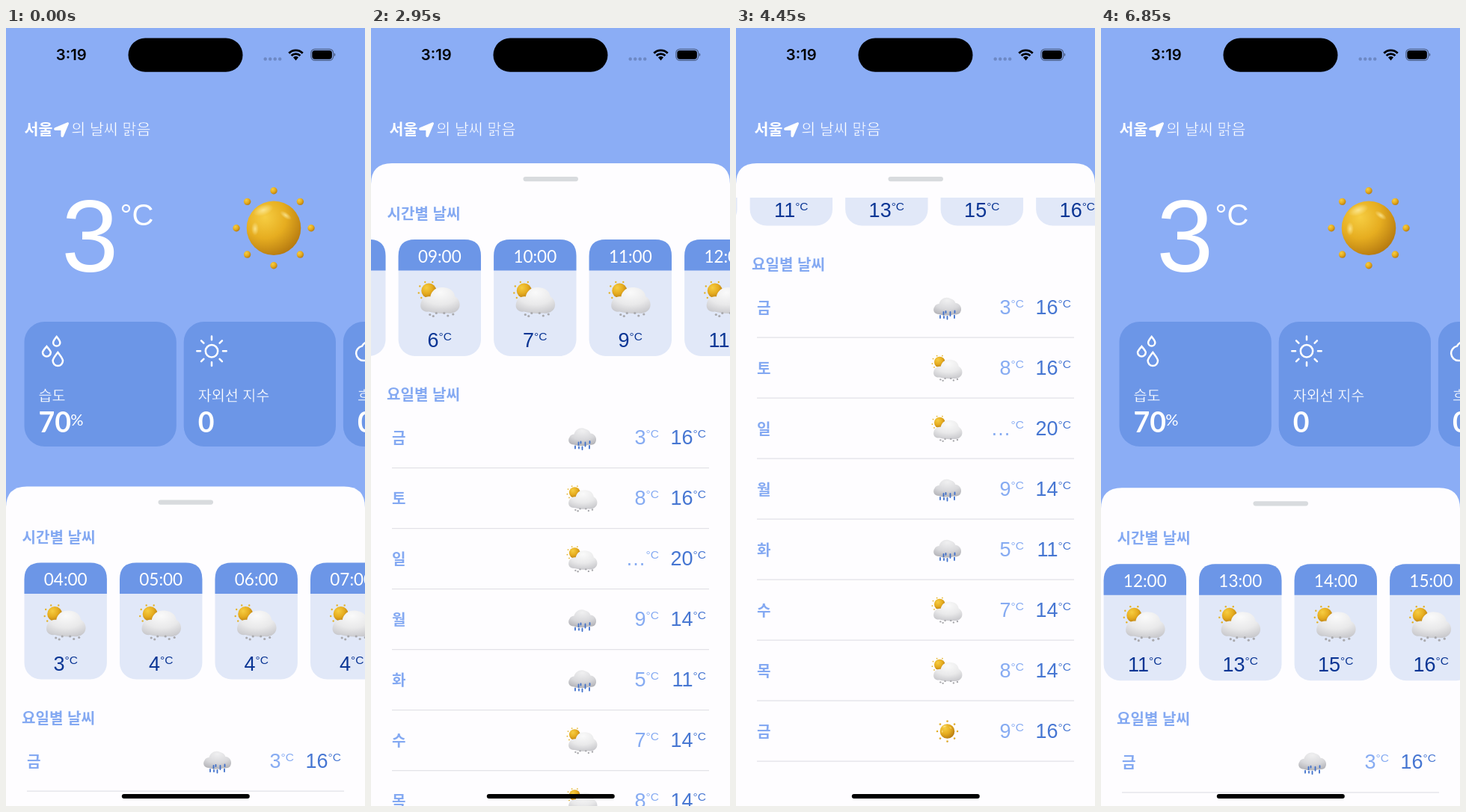
Animation, 480 px wide and 1041 px high, one loop 6.9 s. Source, as an HTML page:

```html
<!DOCTYPE html>
<html lang="ko">
<head>
<meta charset="utf-8">
<title>날씨</title>
<style>
html, body { margin: 0; width: 100%; height: 100%; overflow: hidden; background: #8badf5; }
svg { display: block; width: 100%; height: 100%; }
text { font-family: "Noto Sans CJK KR", "Noto Sans CJK", sans-serif; fill: #fff; }
.num { font-family: "Liberation Sans", sans-serif; font-size: 27px; }
.lato { font-family: Lato, sans-serif; }
.thin { font-weight: 300; stroke: #8badf5; stroke-width: .5; }
.label { font-size: 19.6px; font-weight: 300; stroke: #6c96e7; stroke-width: .3; }
.value { font-size: 37.5px; font-weight: 700; }
.title { font-size: 20.1px; font-weight: 600; fill: #84a9f2; }
.mid { text-anchor: middle; }
.end { text-anchor: end; }
.line { fill: none; stroke: #fff; stroke-width: 2.5; stroke-linecap: round; }
</style>
</head>
<body>
<svg viewBox="0 0 480 1041">
  <defs>
    <radialGradient id="gold" cx=".34" cy=".3" r=".78">
      <stop offset="0" stop-color="#f6cd42"/>
      <stop offset=".5" stop-color="#e6ad20"/>
      <stop offset="1" stop-color="#b2760f"/>
    </radialGradient>
    <radialGradient id="shine">
      <stop offset="0" stop-color="#fff3b0" stop-opacity=".7"/>
      <stop offset="1" stop-color="#fff3b0" stop-opacity="0"/>
    </radialGradient>
    <radialGradient id="puff" cx=".5" cy=".2" r=".85">
      <stop offset="0" stop-color="#fafafa"/>
      <stop offset=".55" stop-color="#e9e9ea"/>
      <stop offset="1" stop-color="#c6c6ca"/>
    </radialGradient>
    <radialGradient id="gray" cx=".5" cy=".15" r=".85">
      <stop offset="0" stop-color="#f0f0f1"/>
      <stop offset=".6" stop-color="#d8d8db"/>
      <stop offset="1" stop-color="#b4b4b9"/>
    </radialGradient>
    <clipPath id="view"><rect y="46" width="480" height="1000"/></clipPath>
    <g id="sun"></g>
    <g id="partly"></g>
    <g id="rain"></g>
  </defs>

  <rect width="480" height="1041" fill="#8badf5"/>

  <text x="24.5" y="143.3" font-size="20.6" font-weight="700">서울</text>
  <path d="M82.2 126.3L65 133.6Q63 136 65.5 137H73.4V144.8Q74.6 147.3 76.8 145.2L84 128Q84.2 125.8 82.2 126.3Z" fill="#fff"/>
  <text class="thin" x="87.2" y="143.3" font-size="20.6">의 날씨 맑음</text>
  <text class="num" x="74.3" y="326" style="font-size:136.5px">3</text>
  <text class="num" x="152.5" y="264" style="font-size:40px">°C</text>
  <use href="#sun" x="358" y="267.7"/>
  <g id="info"></g>

  <g id="sheet">
    <path d="M0 1041V28Q0 0 28 0H452Q480 0 480 28V1041Z" fill="#fefdff"/>
    <rect x="203.5" y="18" width="73.5" height="6.2" rx="3.1" fill="#d8dbde"/>
    <g clip-path="url(#view)">
      <g id="list">
        <text class="title" x="21.5" y="75">시간별 날씨</text>
        <g id="hours"></g>
        <text class="title" x="21" y="317.3">요일별 날씨</text>
        <g id="days"></g>
      </g>
    </g>
  </g>

  <text class="mid" x="87.3" y="43" style="font:600 20.3px Inter,sans-serif;fill:#000">3:19</text>
  <rect x="163.5" y="13.5" width="153" height="45.3" rx="22.6"/>
  <g id="status"></g>
  <rect x="407.8" y="28.3" width="29.8" height="15" rx="5" fill="none" stroke="#000" stroke-opacity=".45" stroke-width="1.2"/>
  <rect x="409.3" y="29.9" width="26.6" height="11.8" rx="3.6"/>
  <path d="M438.8 33.3q3 2.4 0 5z" opacity=".5"/>
  <rect x="154.8" y="1025" width="171" height="6" rx="3"/>
</svg>
<script>
const $ = id => document.getElementById(id);
const add = (id, markup) => { $(id).innerHTML += markup; };
const dots = (points, r, fill) =>
  points.map(([x, y]) => `<circle cx="${x}" cy="${y}" r="${r}" fill="${fill}"/>`).join('');
const ring = (n, r) => Array.from({ length: n }, (_, i) =>
  [r * Math.cos(i * 2 * Math.PI / n), r * Math.sin(i * 2 * Math.PI / n)]);

// weather icons, each centred on 0,0
add('sun', `${dots(ring(8, 50), 4.7, 'url(#gold)')}<circle r="36.3" fill="url(#gold)"/>
  <ellipse cx="-14" cy="-24" rx="14" ry="7" fill="url(#shine)" transform="rotate(-20 -14 -24)"/>
  <ellipse cx="16" cy="-17" rx="9" ry="4" fill="url(#shine)" transform="rotate(35 16 -17)"/>
  <ellipse cx="-25" cy="1" rx="5" ry="9" fill="url(#shine)"/>`);

add('partly', `<circle cx="-14" cy="-11" r="10" fill="url(#gold)"/>
  ${dots([[-19, -22.5], [-9, -22.5], [-26, -17], [-27.5, -8], [-24, -1.5]], 1.2, '#e3b32c')}
  <path d="M-14 17C-22 18-26 13-25 7C-24 0-18-4-12-3C-10-13-1-17 8-15C16-14 20-9 21-3C27 0 29 8 26 13C23 18 17 20 11 19C3 20-6 19-14 17Z" fill="url(#puff)"/>
  ${dots([[-12.5, 21], [-4, 19], [6.5, 19], [18.5, 20.5], [-8, 23], [11.5, 22.5]], 1.6, '#a9a9ad')}`);

add('rain', `<path d="M-11 9C-18 9-20 3-17-1C-16-4-13-5-11-5C-9-12-2-15 4-12C8-11 10-9 11-6C17-6 20 1 18 5C17 9 13 10 9 9C3 11-5 11-11 9Z" fill="url(#gray)"/>
  <path d="M-9.5 11v3M-5 6v3.5M0 12v3.5M-2 5v2M4 6v5M9.5 10.5v3.5M10 4.5v2.5M-4.5 12v2" stroke="#3f70cb" stroke-width="1.8" stroke-linecap="round"/>`);

// info cards
const drop = (x, y, r, h) => {
  const b = y + h - r;
  return `M${x} ${y}C${x + r * .4} ${y + h * .2} ${x + r} ${y + h * .45} ${x + r} ${b}` +
    `A${r} ${r} 0 0 1 ${x - r} ${b}C${x - r} ${y + h * .45} ${x - r * .4} ${y + h * .2} ${x} ${y}Z`;
};
const rays = ring(8, 1).map(([x, y]) =>
  `M${275 + x * 15} ${432.3 + y * 15}L${275 + x * 19.7} ${432.3 + y * 19.7}`).join('');
const infoIcons = [
  drop(67.7, 413, 4.6, 12.5) + drop(54.4, 426, 5.4, 13.5) + drop(69.3, 434, 6.7, 18),
  'M266.8 432.3a8.2 8.2 0 1 0 16.4 0a8.2 8.2 0 1 0-16.4 0' + rays,
  'M490 445H478A9.8 9.8 0 0 1 476 425.6Q479 420 486 419'
];
['습도', '자외선 지수', '흐림'].forEach((name, i) => {
  const x = 24.5 + i * 213.2;
  add('info', `<rect x="${x}" y="393" width="203.3" height="167" rx="27" fill="#6c96e7"/>
    <path class="line" d="${infoIcons[i]}"/>
    <text class="label" x="${x + 19}" y="499">${name}</text>
    <text class="lato value" x="${x + 19}" y="541">${i ? 0 : 70}</text>`);
});
add('info', '<text class="lato" x="86.3" y="532" font-size="21.5">%</text>');

// hourly and daily forecast
const temp = (x, y, n, color, align) =>
  `<text class="num ${align}" x="${x}" y="${y}" style="fill:${color}">${n}<tspan dy="-9" font-size="15.5">°C</tspan></text>`;

[3, 4, 4, 4, 5, 6, 7, 9, 11, 13, 15, 16].forEach((n, i) => {
  const x = 24.5 + i * 127.5, mid = x + 55.2;
  add('hours', `<rect x="${x}" y="102" width="110.4" height="156" rx="22" fill="#e1e8f8"/>
    <path d="M${x} 143.5V124q0-22 22-22h66.4q22 0 22 22v19.5z" fill="#6c96e7"/>
    <text class="lato mid" x="${mid}" y="132.5" font-size="22.5">${String(i + 4).padStart(2, 0)}:00</text>
    <use href="#partly" x="${mid - .5}" y="181.5"/>
    ${temp(mid, 246.3, n, '#0a3594', 'mid')}`);
});

[['금', 'rain', 3, 16], ['토', 'partly', 8, 16], ['일', 'partly', '…', 20], ['월', 'rain', 9, 14],
 ['화', 'rain', 5, 11], ['수', 'partly', 7, 14], ['목', 'partly', 8, 14], ['금', 'sun', 9, 16]
].forEach(([day, icon, low, high], i) => {
  const scale = { rain: 1, partly: .73, sun: .27 }[icon];
  add('days', `<g transform="translate(0 ${i * 81})">
    <text class="title" x="28" y="375">${day}</text>
    <use href="#${icon}" transform="translate(282.5 367.5) scale(${scale})"/>
    ${temp(385, 376.3, low, '#86abf2', 'end')}${temp(448, 376.3, high, '#4676d2', 'end')}
    <path d="M28 407.6H452" stroke="#e2e2e7" stroke-width="1.2"/></g>`);
});

// status bar
const arc = r => `M${387.5 - r * .72} ${42.8 - r * .7}A${r} ${r} 0 0 1 ${387.5 + r * .72} ${42.8 - r * .7}`;
add('status', dots([0, 1, 2, 3].map(i => [346.7 + i * 6.5, 41.5]), 2.2, '#6c88c4') +
  `<path d="${arc(12.8)}${arc(8.2)}" fill="none" stroke="#000" stroke-width="2.8"/><path d="${arc(4.9)}L387.5 43.5Z"/>`);

// motion, times in seconds
const TOP = 181, DEPTH = 161.5;
const settle = s => s < 0 ? 0 : 1 - (1 + 11 * s) * Math.exp(-11 * s);

function swipe(t) {
  if (t < 2.371) return 0;
  if (t < 2.6) return 195.5 * ((t - 2.371) / .229) ** 2;
  return 1046.5 - 851 * Math.exp((2.6 - t) / .4975);
}

function scroll(t) {
  if (t < 3.9) return 0;
  const s = t - 4.085;
  if (s < 0) return DEPTH * ((t - 3.9) / .185) ** 1.16;
  return DEPTH + 950 * s * Math.exp(-9 * s);
}

function pose(t) {
  if (t < 1.3) return [613.5, 0];
  if (t < 5.1) return [613.5 - (613.5 - TOP) * settle(t - 1.27), scroll(t)];
  if (t < 5.45) return [TOP, DEPTH];
  // one pull: the list returns to its top, then the sheet follows
  const p = TOP - DEPTH + (615.2 - TOP + DEPTH) * settle(t - 5.42);
  return [Math.max(TOP, p), Math.max(0, TOP - p)];
}

const move = (id, x, y) => $(id).setAttribute('transform', `translate(${x} ${y})`);
const start = performance.now();

function draw(now) {
  const t = Math.floor(Math.max(0, now - start) % 6900 / 50) * .05 + 1e-6;
  const [sheet, list] = pose(t);
  move('sheet', 0, sheet);
  move('list', 0, -list);
  move('hours', -swipe(Math.min(t, 5.1)), 0);
  requestAnimationFrame(draw);
}
draw(start);
</script>
</body>
</html>
```
